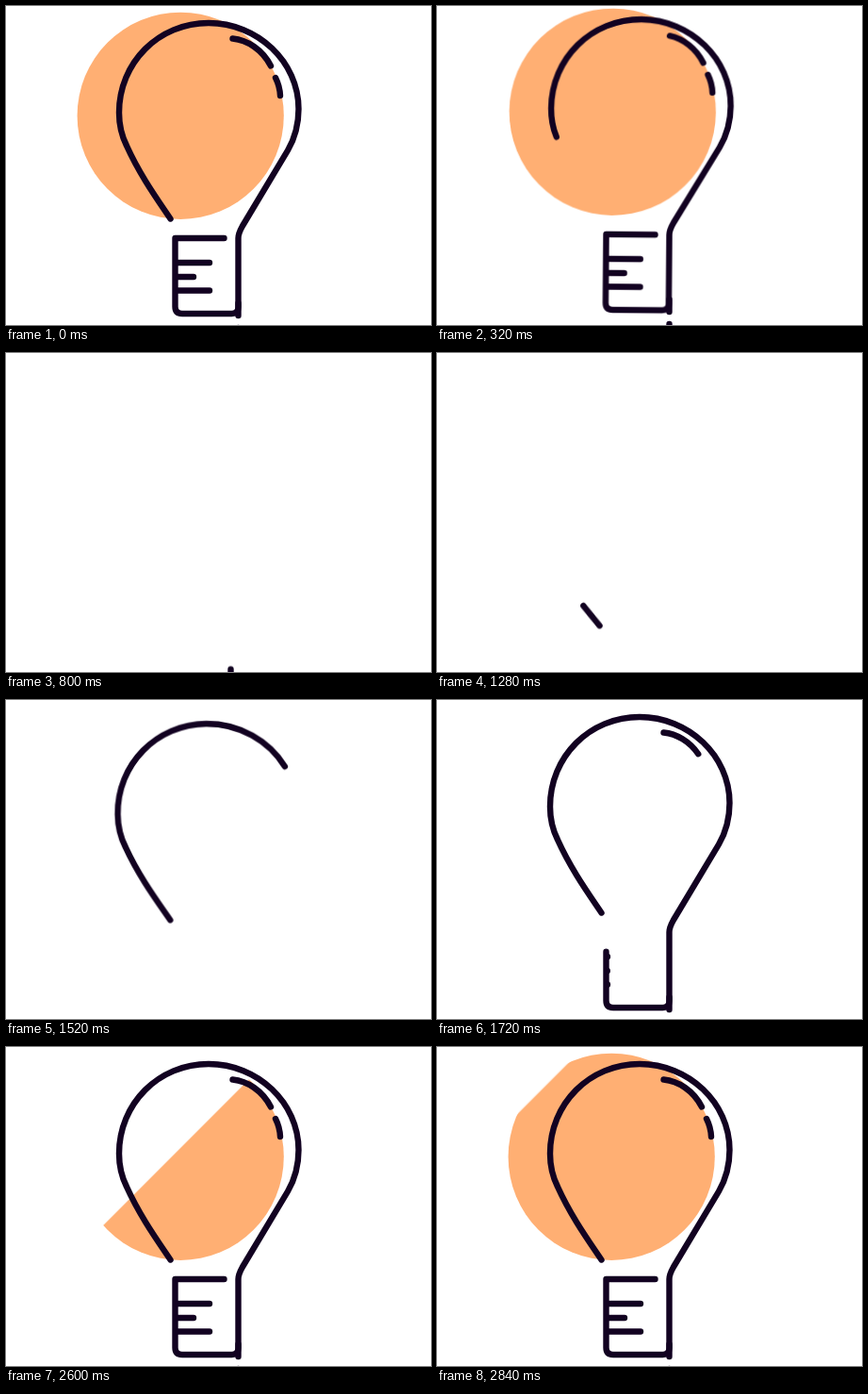
An HTML page for the animation above (2880 ms loop, 451 by 338 pixels).

```html
<!DOCTYPE html>
<html lang="en">
<head>
<meta charset="utf-8">
<title>Light bulb</title>
<style>
  html, body { margin: 0; width: 100%; height: 100%; overflow: hidden; background: #fff; }
  svg { display: block; width: 100%; height: 100%; }

  .ink { fill: none; stroke: #120221; stroke-width: 6.4; stroke-linecap: round; stroke-linejoin: round; }
  .bulb, .trail, .wipe, .draw { animation: 2880ms linear infinite; }
  /* every drawn path has pathLength 100; offset 100.3 and -100.3 are both hidden */
  .draw { stroke-dasharray: 100.2 200; }

  .bulb { transform-origin: 215px 250px; animation-name: fly; }
  .wipe { animation-name: wipe; }
  .trail { animation-name: drift; }
  .outline { animation-name: outline; }
  .shine1 { animation-name: shine1; }
  .shine2 { animation-name: shine2; }
  .tick { animation-name: tick; }
  .puff { animation-name: puff; }
  .late { animation-delay: 150ms; }

  @keyframes fly {
    0%, 3.472% { transform: translateY(0) rotate(0deg); animation-timing-function: cubic-bezier(.5, 0, .75, 0); }
    27.778% { transform: translateY(-290px) rotate(37deg); animation-timing-function: step-end; }
    38.889% { transform: translateY(78px) rotate(-6.5deg); animation-timing-function: cubic-bezier(.37, 0, .63, 1); }
    56.25%, 100% { transform: translateY(0) rotate(0deg); }
  }
  @keyframes wipe {
    0%, 12.5% { transform: translateX(0); animation-timing-function: cubic-bezier(.37, 0, .63, 1); }
    27.778% { transform: translateX(-223px); animation-timing-function: step-end; }
    76.389% { transform: translateX(221px); animation-timing-function: cubic-bezier(.4, 0, .68, .85); }
    100% { transform: translateX(0); }
  }
  @keyframes outline {
    0%, 4.167% { stroke-dashoffset: 0; animation-timing-function: cubic-bezier(.65, 0, .35, 1); }
    27.431% { stroke-dashoffset: -100.3; animation-timing-function: step-end; }
    39.41% { stroke-dashoffset: 100.3; animation-timing-function: cubic-bezier(.65, 0, .35, 1); }
    67.361%, 100% { stroke-dashoffset: 0; }
  }
  @keyframes shine1 {
    0%, 9.028% { stroke-dashoffset: 0; animation-timing-function: cubic-bezier(.65, 0, .35, 1); }
    16.667% { stroke-dashoffset: -100.3; animation-timing-function: step-end; }
    53.472% { stroke-dashoffset: 100.3; animation-timing-function: cubic-bezier(.37, 0, .63, 1); }
    61.806%, 100% { stroke-dashoffset: 0; }
  }
  @keyframes shine2 {
    0%, 14.583% { stroke-dashoffset: 0; animation-timing-function: cubic-bezier(.65, 0, .35, 1); }
    18.75% { stroke-dashoffset: -100.3; animation-timing-function: step-end; }
    61.806% { stroke-dashoffset: 100.3; animation-timing-function: cubic-bezier(.37, 0, .63, 1); }
    67.361%, 100% { stroke-dashoffset: 0; }
  }
  @keyframes tick {
    0%, 16.667% { stroke-dashoffset: 0; animation-timing-function: cubic-bezier(.65, 0, .35, 1); }
    27.778%, 58.333% { stroke-dashoffset: 100.3; animation-timing-function: cubic-bezier(.37, 0, .63, 1); }
    77.083%, 100% { stroke-dashoffset: 0; }
  }
  @keyframes puff {
    0%, 19.444% { stroke-dashoffset: 0; }
    25% { stroke-dashoffset: -100.3; animation-timing-function: step-end; }
    56.944% { stroke-dashoffset: 100.3; }
    59.722%, 100% { stroke-dashoffset: 0; }
  }
  @keyframes drift {
    0% { transform: translate(0, 0); animation-timing-function: ease-in; }
    11.111% { transform: translate(0, -4px); }
    19.444% { transform: translate(-5px, -8.5px); }
    30.556% { transform: translate(-9px, -15px); animation-timing-function: step-end; }
    38.889%, 100% { transform: translate(0, 0); }
  }
</style>
</head>
<body>
<svg viewBox="0 0 451 338" preserveAspectRatio="none">
  <clipPath id="disc"><circle cx="185.2" cy="116.3" r="109.6"/></clipPath>

  <g class="trail ink">
    <path class="draw puff" pathLength="100" d="M246.5 315V328"/>
    <path class="draw puff late" pathLength="100" d="M246.5 341V354"/>
  </g>

  <g class="bulb">
    <g clip-path="url(#disc)">
      <g transform="translate(185.2 116.3) rotate(45)">
        <rect class="wipe" x="-110.3" y="-115" width="222" height="230" fill="#ffaf73"/>
      </g>
    </g>
    <g class="ink">
      <path class="draw outline" pathLength="100" d="M174.5 225.5C160 204 142 179 128 148C123 138 120 127 120 113C120 60 162 18 215 18C267 18 310.5 59 310.5 109C310.5 125 306 141 299 153L251 233Q246.5 241 246.5 246V319Q246.5 326 239.5 326H187Q179.5 326 179.5 318.5V246H231.5"/>
      <path class="draw shine1" pathLength="100" d="M240.5 34.5C256 36 272 46 281 63.5"/>
      <path class="draw shine2" pathLength="100" d="M286 76Q290.5 85 291 95"/>
      <path class="draw tick" pathLength="100" d="M180.5 272H216"/>
      <path class="draw tick" pathLength="100" d="M180.5 287H199"/>
      <path class="draw tick" pathLength="100" d="M180.5 301.5H216"/>
    </g>
  </g>
</svg>
</body>
</html>
```
